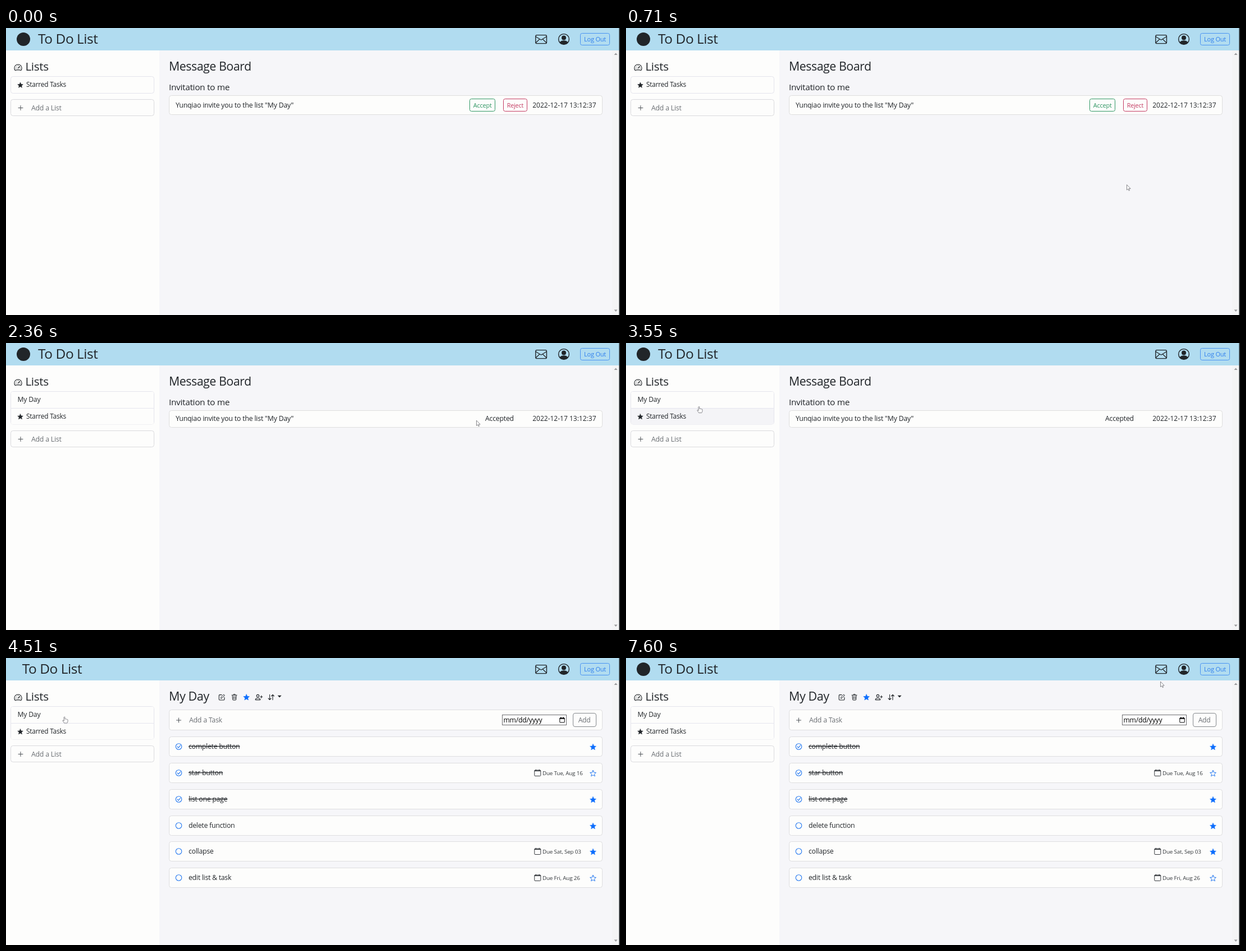
Write an HTML page that moves like this. It is 1093 px wide and 512 px high and loops after 8.52 s.

```html
<!DOCTYPE html>
<html lang="en">
<head>
<meta charset="utf-8">
<title>To Do List</title>
<style>
html, body { margin: 0; width: 100%; height: 100%; overflow: hidden; background: #f6f6f9; }
svg { display: block; width: 1093px; height: 512px; }
text { font-family: "Open Sans", "Noto Sans", sans-serif; letter-spacing: -.018em; white-space: pre; }
</style>
</head>
<body>
<svg id="stage" viewBox="0 0 1093 512" xmlns="http://www.w3.org/2000/svg"></svg>
<script>
const LOOP = 8520;
const INK = '#212529', BLUE = '#0d6efd', GRAY = '#6c7075', CARD = '#fdfdfc';
const GREEN = '#2f9763', RED = '#c43b62', EDGE = '#dedee0';

const text = (x, y, s, size = 12.2, fill = INK, extra = '') =>
  `<text x="${x}" y="${y}" font-size="${size}" fill="${fill}" ${extra}>${s}</text>`;
const box = (x, y, w, h, fill = CARD, stroke = EDGE, r = 4, extra = '') =>
  `<rect x="${x}" y="${y}" width="${w}" height="${h}" rx="${r}" fill="${fill}" stroke="${stroke}" ${extra}/>`;
const line = (d, stroke = INK, w = 1.1, fill = 'none') =>
  `<path d="${d}" fill="${fill}" stroke="${stroke}" stroke-width="${w}" stroke-linecap="round" stroke-linejoin="round"/>`;
const ring = (x, y, r, stroke, w = 1.1, fill = 'none') =>
  `<circle cx="${x}" cy="${y}" r="${r}" fill="${fill}" stroke="${stroke}" stroke-width="${w}"/>`;
const group = (id, body) => `<g id="${id}">${body}</g>`;

function star(x, y, r, color, filled = true) {
  let d = '';
  for (let i = 0; i < 10; i++) {
    const a = i * Math.PI / 5, k = i % 2 ? r * .46 : r;
    d += `${i ? 'L' : 'M'}${(x + k * Math.sin(a)).toFixed(2)} ${(y - k * Math.cos(a)).toFixed(2)}`;
  }
  return line(d + 'Z', color, filled ? .6 : 1, filled ? color : 'none');
}

const plus = (x, y, r = 4) => line(`M${x - r} ${y}h${2 * r}M${x} ${y - r}v${2 * r}`, '#4d5257', 1);

function calendar(x, y) {
  return box(x - 5.5, y - 5, 11, 10.5, 'none', INK, 1.2, 'stroke-width=".9"') +
    line(`M${x - 5} ${y - 3.6}h10`, INK, 1.3) + line(`M${x - 3} ${y - 5.8}v1M${x + 3} ${y - 5.8}v1`, INK, .9);
}

function header() {
  return '<rect width="1093" height="40" fill="#b1dcf0"/>' +
    group('logo', `<circle cx="31" cy="20" r="12" fill="${INK}"/>`) +
    group('brand', text(57, 28, 'To Do List', 24.4)) +
    box(942.8, 12.6, 19.6, 15, 'none', INK, 2.2, 'stroke-width="1.4"') +
    line('M943.2 15.5L952.6 21.2L962 15.5M943.3 26.3L950 19.8M961.9 26.3L955.2 19.8', INK, 1.2) +
    ring(993, 20, 9.4, INK, 1.4) + `<circle cx="993" cy="17.4" r="4" fill="${INK}"/>` +
    `<path d="M985.6 25.6Q988 22.2 993 22.2T1000.4 25.6Q997.6 29.6 993 29.6T985.6 25.6Z" fill="${INK}"/>` +
    box(1022.5, 9.5, 52, 21, 'none', '#4a94f2', 3) + text(1029, 24, 'Log Out', 11, '#2f7fee');
}

function sidebar() {
  return '<rect y="40" width="273" height="472" fill="#fdfdfc"/>' +
    line('M16.3 75.6A6.6 6.6 0 1 1 26.7 75.6Q21.5 73.6 16.3 75.6Z', INK, 1.1) +
    line('M21.3 71.8L24.6 68.6', INK, 1.4) +
    line('M21.5 66.6v.8M17.4 71.6h.9M24.9 71.6h.8M18.5 68.6l.5.5', INK, .8) +
    text(34.5, 76, 'Lists', 20.7) +
    '<rect id="listCard" x="8.5" y="86.5" width="255" height="30" rx="4" fill="#fdfdfc" stroke="#e4e4ec"/>' +
    group('myDay', '<rect id="dayRow" x="9" y="87" width="254" height="29" rx="3"/>' +
      '<rect id="starRow" x="9" y="116.5" width="254" height="28.5" rx="3"/>' +
      line('M9 116.5h254', '#e6e6ee', 1) + text(20.5, 105, 'My Day')) +
    group('starred', star(25.5, 102.2, 5, INK) + text(36, 105, 'Starred Tasks', 11.9)) +
    group('addList', box(8.5, 127.5, 255, 29, CARD, '#dadadd') + plus(26, 142.5) + text(45, 146.7, 'Add a List', 12.3, GRAY));
}

function board() {
  return text(290, 76, 'Message Board', 21.2) + text(290, 111, 'Invitation to me', 15.3) +
    '<rect id="inviteCard" x="290.5" y="120.5" width="771" height="34" rx="4" fill="#fdfdfc" stroke="#dedede"/>' +
    group('invite', text(302, 142, 'Yunqiao invite you to the list "My Day"', 12.35) +
      text(1050.5, 142, '2022-12-17 13:12:37', 12, INK, 'text-anchor="end" style="letter-spacing:0"')) +
    group('choices', box(825.5, 126.5, 45, 22, CARD, GREEN, 3, 'id="accept"') +
      text(831.7, 142, 'Accept', 11, GREEN, 'id="acceptText"') +
      box(885.5, 126.5, 42, 22, CARD, RED, 3) + text(891.7, 142, 'Reject', 10.8, RED)) +
    group('accepted', text(853, 139, 'Accepted', 12.3));
}

function toolIcons() {
  return line('M384 65.6h-3.6a1.2 1.2 0 0 0-1.2 1.2v7a1.2 1.2 0 0 0 1.2 1.2h7.2a1.2 1.2 0 0 0 1.2-1.2V70.3') +
    line('M382.6 71.8l.5-2.2L387.6 65l1.7 1.7-4.6 4.6Z', INK, 1) +
    line('M402 66.2h9M405 66v-1.2h3V66M403 67l.5 7.2a1 1 0 0 0 1 .9h4a1 1 0 0 0 1-.9L410 67M405.2 68.5v4.6M407.8 68.5v4.6', INK, 1) +
    star(428, 70.4, 5.6, BLUE) +
    ring(448.3, 67.6, 2.2, INK) + line('M444 74.6Q444 71.5 448.3 71.5T452.6 74.6Z', INK) +
    line('M454.6 67.2v4M452.6 69.2h4', INK) +
    line('M469.4 65.4v9M467 72l2.4 2.5 2.4-2.5M474.8 74.6v-9M472.4 68l2.4-2.5 2.4 2.5', INK) +
    `<path d="M483.4 66.8h7l-3.5 3.6Z" fill="${INK}"/>`;
}

const TASKS = [
  ['complete button', 1, 1],
  ['star button', 1, 0, 'Due Tue, Aug 16'],
  ['list one page', 1, 1],
  ['delete function', 0, 1],
  ['collapse', 0, 1, 'Due Sat, Sep 03'],
  ['edit list &amp; task', 0, 0, 'Due Fri, Aug 26']
];

function task([name, done, starred, due], i) {
  const y = Math.round(158 + i * 46.85);
  return box(290.5, y - 17.5, 771, 35) + ring(307.5, y, 5.3, '#2478f0') +
    (done ? line(`M305 ${y}l2 2.1 3.3-4`, '#2478f0') : '') +
    text(325, y + 4, name, 12.2, INK, done ? 'text-decoration="line-through"' : '') +
    (due ? calendar(946.3, y) + text(955, y + 3.6, due, 9.85, '#34383c') : '') +
    star(1045, y + 1.2, 5.7, starred ? BLUE : '#2478f0', starred);
}

function dayPage() {
  return text(290, 76, 'My Day', 21.4) + toolIcons() +
    box(290.5, 92.5, 771, 36) + plus(307.5, 111) + text(326, 115, 'Add a Task', 12.3, GRAY) +
    box(883.5, 101.5, 114, 18, '#fff', '#6d6d70', 0) + text(885.5, 115, 'mm/dd/yyyy', 12.2, '#000') +
    box(985.8, 107, 8.4, 8, 'none', '#000', .5) + line('M986 108h8M987.8 106v1M992.2 106v1', '#000', 1.4) +
    box(1009.5, 98.5, 41, 24, CARD, '#85898d', 3.5) + text(1018.7, 115, 'Add', 12.1, GRAY) +
    TASKS.map(task).join('');
}

function frameEdge() {
  return '<rect x="1079" y="40" width="13" height="472" fill="#f4f4f5"/>' +
    '<path d="M1082.5 48l3-3.4 3 3.4ZM1082.5 502.5l3 3.4 3-3.4Z" fill="#9a9a9c"/>' +
    '<rect x="1091.4" width="1.6" height="512" fill="#1b2023"/>';
}

const pointers =
  group('arrow', line('M0 0V9L2.2 7.2 3.7 10.3 5 9.7 3.6 6.6H6.3Z', '#6b6b70', .8, '#fff')) +
  group('hand', line('M-.9 1Q0-.6 .9 1V4.4Q2 3.6 2.8 4.7 3.8 4 4.6 5 5.9 4.7 6 6V8.6Q5.6 10.6 4.8 11.6H-.3Q-1.6 9.5-3 7.6-3.2 6-1.9 6.6L-.9 7.4Z',
    '#6b6b70', .8, '#fff'));

document.getElementById('stage').innerHTML = header() + sidebar() +
  group('board', board()) + group('dayPage', dayPage()) + frameEdge() + group('pointer', pointers);

const $ = id => document.getElementById(id);
const show = (id, on) => $(id).setAttribute('visibility', on ? 'inherit' : 'hidden');
const shift = (id, x, y) => $(id).setAttribute('transform', `translate(${x} ${y})`);
const set = (id, name, v) => $(id).setAttribute(name, v);

// time, x, y of the pointer tip
const PATH = [
  [30, 985, 516], [400, 920, 345], [710, 891.5, 280], [900, 891, 277], [1400, 843, 150], [1590, 837.5, 138.5],
  [2520, 837.5, 138.5], [2640, 826, 139], [2900, 800, 141], [3300, 300, 146], [3450, 152, 125],
  [3550, 130, 113], [3800, 104, 104.5], [4910, 104, 104.5], [5250, 480, 62], [5500, 890, 8], [5650, 965.5, .5]
];

function pointerAt(t) {
  if (t >= 7600) return [951.5, 42.5];
  if (t >= 6680) return [956, 20];
  let i = 1;
  while (i < PATH.length && PATH[i][0] <= t) i++;
  const a = PATH[i - 1], b = PATH[i];
  if (!b) return [a[1], a[2]];
  const k = Math.max(0, (t - a[0]) / (b[0] - a[0]));
  return [a[1] + (b[1] - a[1]) * k, a[2] + (b[2] - a[2]) * k];
}

function render(t) {
  const [x, y] = pointerAt(t);
  const joined = t >= 2360, day = t >= 4360, logo = !day || t >= 4590;
  const inside = (l, top, r, bottom) => x >= l && x <= r && y >= top && y <= bottom;
  const overAccept = !joined && inside(825, 127, 871, 149);
  const overList = inside(9, 87, 264, joined ? 186 : 157);
  const overMail = inside(942, 12, 963, 28);

  show('board', !day);
  show('dayPage', day);
  show('logo', logo);
  shift('brand', logo ? 0 : -28.3, 0);

  show('myDay', joined);
  set('listCard', 'height', joined ? 58.5 : 30);
  shift('starred', 0, joined ? 29.6 : 0);
  shift('addList', 0, joined ? 29 : 0);
  const onStar = !day && overList && t < 3580;
  set('starRow', 'fill', onStar ? '#f4f4f7' : CARD);
  set('dayRow', 'fill', !day && overList && !onStar ? '#f4f4f7' : CARD);

  set('inviteCard', 'height', joined ? 30 : 34);
  shift('invite', 0, joined ? -3 : 0);
  show('choices', !joined && !day);
  show('accepted', joined && !day);
  set('accept', 'fill', overAccept ? '#1f9456' : CARD);
  set('acceptText', 'fill', overAccept ? '#fff' : GREEN);

  const hand = overAccept || overList || overMail;
  show('pointer', t >= 30);
  show('hand', hand && t >= 30);
  show('arrow', !hand && t >= 30);
  shift('pointer', x.toFixed(2), y.toFixed(2));
}

const start = performance.now();
function tick() {
  render((performance.now() - start) % LOOP);
  requestAnimationFrame(tick);
}
tick();
</script>
</body>
</html>
```
